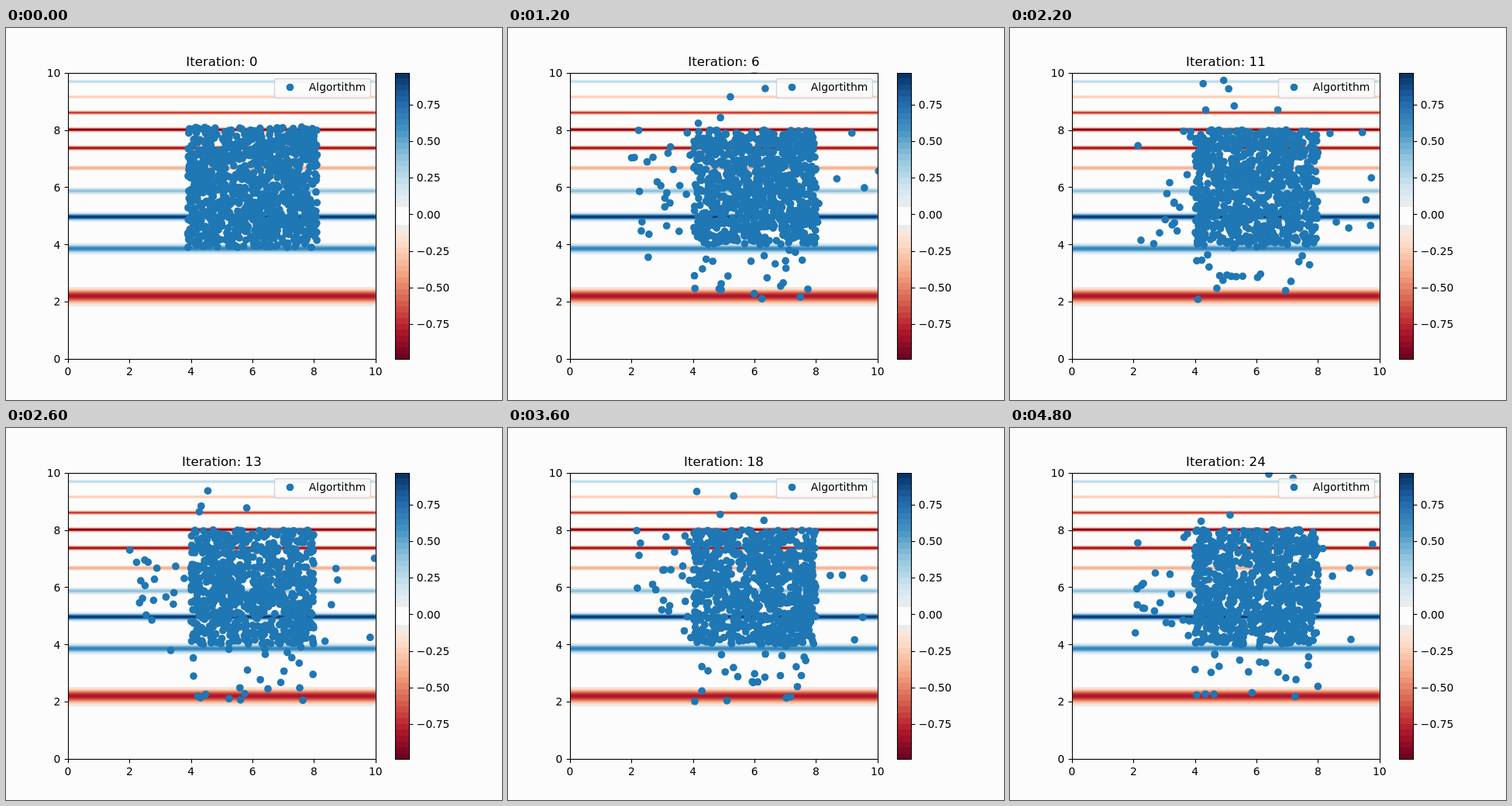
An HTML page with a canvas that plays this animation: 640x480 px, repeating every 5 s.

```html
<!DOCTYPE html>
<html lang="en">
<head>
<meta charset="utf-8">
<title>Search iterations</title>
<style>
  html, body { margin: 0; width: 100%; height: 100%; overflow: hidden; background: #fcfcfc; }
  canvas { display: block; }
</style>
</head>
<body>
<canvas id="stage" width="640" height="480"></canvas>
<script>
const STEP = 200, STEPS = 25;
const PAPER = '#fcfcfc', DOT = '#1f77b4', DOT_R = 4.86;
const plot = { left: 80, top: 57.6, right: 476.8, bottom: 427.2 };
const bar = { left: 501.6, right: 520.1 };
const BANDS = 49, LOW = -0.988, HIGH = 0.967;
const FONT = '"DejaVu Sans", Verdana, sans-serif';
const RAMP = ['67001f', 'b2182b', 'd6604d', 'f4a582', 'fddbc7', 'f7f7f7',
  'd1e5f0', '92c5de', '4393c3', '2166ac', '053061']
  .map(h => [0, 2, 4].map(i => parseInt(h.slice(i, i + 2), 16)));

const ctx = document.getElementById('stage').getContext('2d');
const px = x => plot.left + x * (plot.right - plot.left) / 10;
const py = y => plot.bottom - y * (plot.bottom - plot.top) / 10;
const snap = v => Math.floor(v + 0.5) + 0.5;
const rgb = c => `rgb(${c.map(Math.round).join(',')})`;

// Diverging colour of one contour band, neutral around zero
function bandColor(k) {
  const off = Math.abs(k - (BANDS - 1) / 2);
  if (off < 2) return [252, 252, 252];
  if (off === 2) return [235, 235, 235];
  const t = (k + 0.5) / BANDS * 10, i = Math.min(9, Math.floor(t));
  return RAMP[i].map((c, n) => c + (RAMP[i + 1][n] - c) * (t - i));
}
const bandColors = Array.from({ length: BANDS }, (_, k) => bandColor(k));

const field = y => -Math.sin(y) * Math.sin(y * y / Math.PI) ** 20;

function fieldColor(y) {
  const k = Math.floor((field(y) - LOW) / (HIGH - LOW) * BANDS);
  return bandColors[Math.max(0, Math.min(BANDS - 1, k))];
}

function random(seed) {
  let s = seed;
  return () => {
    s = (s + 0x6D2B79F5) | 0;
    let t = Math.imul(s ^ (s >>> 15), 1 | s);
    t = (t + Math.imul(t ^ (t >>> 7), 61 | t)) ^ t;
    return ((t ^ (t >>> 14)) >>> 0) / 4294967296;
  };
}

// Even population inside the square, with stragglers once the search has begun
function population(step) {
  const rnd = random(7919 * (step + 1));
  const between = (a, b) => a + (b - a) * rnd();
  const points = [];
  const add = (n, x, y) => { while (n-- > 0) points.push([x(), y()]); };
  if (step === 0) {
    const wide = () => between(3.9, 8.1);
    add(1000, wide, wide);
    return points;
  }
  const core = () => between(4, 8);
  const below = () => between(2, 4);
  const above = () => 8 + 2.1 * rnd() ** 1.3;
  const side = () => rnd() < 0.03 ? below() : core();
  const some = (a, b) => Math.floor(between(a, b + 1));
  add(860, core, core);
  add(some(19, 24), below, core);
  add(some(21, 26), side, below);
  add(some(5, 8), above, core);
  add(some(4, 6), side, above);
  return points;
}

function line(x1, y1, x2, y2) {
  ctx.beginPath();
  ctx.moveTo(x1, y1);
  ctx.lineTo(x2, y2);
  ctx.stroke();
}

function text(str, x, y, align, size = 13.89) {
  ctx.font = `${size}px ${FONT}`;
  ctx.textAlign = align;
  ctx.fillStyle = '#000';
  ctx.fillText(str, x, y);
}

function dot(x, y) {
  ctx.beginPath();
  ctx.arc(x, y, DOT_R, 0, 2 * Math.PI);
  ctx.fill();
}

function frame(left, right) {
  const x = snap(left), y = snap(plot.top);
  ctx.strokeRect(x, y, snap(right) - x, snap(plot.bottom) - y);
}

function drawField() {
  const sub = 8, width = plot.right - plot.left;
  for (let row = 58; row < 428; row++) {
    const sum = [0, 0, 0];
    for (let i = 0; i < sub; i++) {
      const y = (plot.bottom - row - (i + 0.5) / sub) / (plot.bottom - plot.top) * 10;
      fieldColor(y).forEach((c, n) => { sum[n] += c / sub; });
    }
    ctx.fillStyle = rgb(sum);
    ctx.fillRect(plot.left, row, width, 1);
  }
}

function drawBar() {
  const h = (plot.bottom - plot.top) / BANDS;
  bandColors.forEach((c, k) => {
    const top = Math.round(plot.bottom - (k + 1) * h);
    ctx.fillStyle = rgb(c);
    ctx.fillRect(502, top, 18, Math.round(plot.bottom - k * h) - top);
  });
  frame(bar.left, bar.right);
  for (let i = -3; i <= 3; i++) {
    const v = i / 4;
    const y = plot.top + (HIGH - v) / (HIGH - LOW) * (plot.bottom - plot.top);
    line(520.5, snap(y), 525.4, snap(y));
    text((v < 0 ? '\u2212' : '') + Math.abs(v).toFixed(2), 529.8, Math.round(y + 5.2), 'left');
  }
}

function drawAxes() {
  frame(plot.left, plot.right);
  for (let v = 0; v <= 10; v += 2) {
    const x = snap(px(v)), y = snap(py(v));
    line(x, 427.5, x, 432.4);
    line(75.6, y, 80.5, y);
    text(v, px(v), 448, 'center');
    text(v, 70.3, Math.round(py(v) + 5.2), 'right');
  }
}

function drawLegend() {
  ctx.beginPath();
  ctx.roundRect(346.5, 65.5, 124, 25, 2.8);
  ctx.fillStyle = 'rgba(252,252,252,0.8)';
  ctx.fill();
  ctx.strokeStyle = 'rgba(204,204,204,0.8)';
  ctx.lineWidth = 1.39;
  ctx.stroke();
  ctx.fillStyle = DOT;
  dot(366.5, 76.5);
  text('Algortithm', 390.8, 81, 'left');
}

function draw(step) {
  ctx.fillStyle = PAPER;
  ctx.fillRect(0, 0, 640, 480);
  ctx.strokeStyle = '#000';
  ctx.lineWidth = 1.11;
  drawField();
  ctx.save();
  ctx.beginPath();
  ctx.rect(plot.left, plot.top, plot.right - plot.left, plot.bottom - plot.top);
  ctx.clip();
  ctx.fillStyle = DOT;
  population(step).forEach(([x, y]) => dot(px(x), py(y)));
  ctx.restore();
  drawAxes();
  drawBar();
  text('Iteration: ' + step, 278.4, 49, 'center', 16.67);
  drawLegend();
}

let shown = -1;
const start = performance.now();
function tick(now) {
  const step = Math.floor(Math.max(0, now - start) / STEP) % STEPS;
  if (step !== shown) draw(shown = step);
  requestAnimationFrame(tick);
}
tick(start);
</script>
</body>
</html>
```
